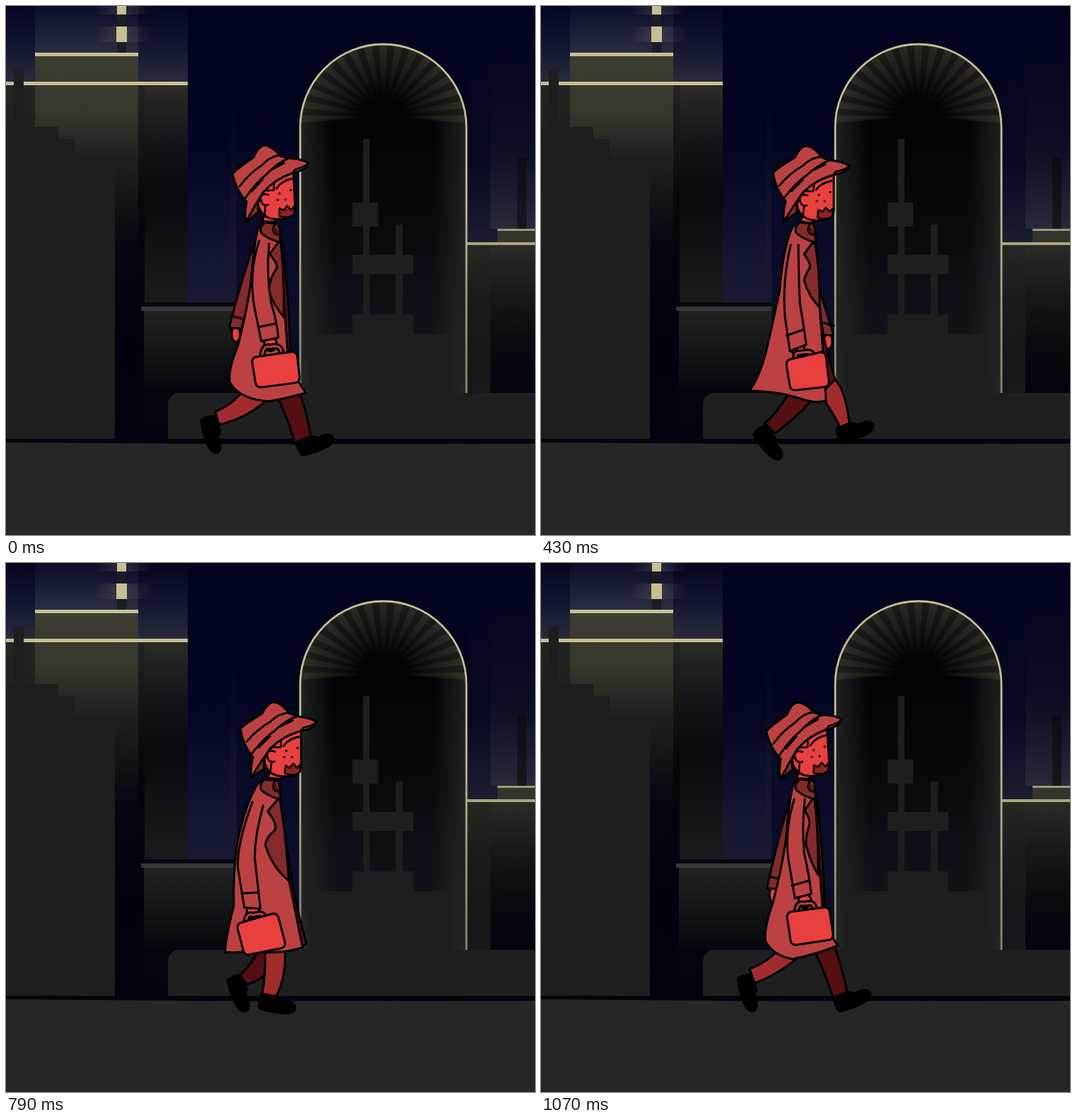
Animation, 748 px wide and 748 px high, one loop 1.14 s. Source, as an HTML page with a canvas:

```html
<!DOCTYPE html>
<html lang="en">
<head>
<meta charset="utf-8">
<title>Night walk</title>
<style>
html, body { margin: 0; width: 100%; height: 100%; overflow: hidden; background: #02031e; }
canvas { display: block; width: 748px; height: 748px; }
</style>
</head>
<body>
<canvas id="stage" width="748" height="748"></canvas>
<script>
const ctx = document.getElementById('stage').getContext('2d');
const COAT = '#bb4142', SHADE = '#832a2c', DEEP = '#541012', LEG = '#a12c2e', SKIN = '#e83f3f';
const CREAM = '#c5bf93', TOWN = '#1e1e1e';

// ---------- city ----------
function rect(x, y, w, h, ...colors) {
  const g = ctx.createLinearGradient(0, y, 0, y + h);
  colors.forEach((c, i) => g.addColorStop(i / Math.max(1, colors.length - 1), c));
  ctx.fillStyle = colors.length > 1 ? g : colors[0];
  ctx.fillRect(x, y, w, h);
}

function side(x0, x1, y, h, color) {
  const g = ctx.createLinearGradient(x0, 0, x1, 0);
  g.addColorStop(0, color);
  g.addColorStop(1, color.replace(/[\d.]+\)$/, '0)'));
  ctx.fillStyle = g;
  ctx.fillRect(Math.min(x0, x1), y, Math.abs(x1 - x0), h);
}

function leftBlocks() {
  rect(0, 0, 257, 108, '#05061f', '#12142f', '#292b3c');
  rect(41, 0, 146, 67, '#0b0d29', '#2b2d42');
  for (const [y, h] of [[0, 12], [29, 22]]) {
    side(163, 125, y, h, 'rgba(150,146,120,.22)');
    side(163, 208, y, h, 'rgba(150,146,120,.22)');
  }
  rect(157, 0, 13, 66, '#1b1c24');
  rect(157, 0, 13, 12, CREAM);
  rect(156, 29, 15, 22, CREAM);
  rect(0, 112, 41, 110, '#22251f', TOWN);
  rect(41, 71, 146, 150, '#3d3d32', '#36372d', TOWN);
  rect(154, 220, 42, 391, '#1e1f1e', '#04050e', '#01020f', '#02030f');
  rect(187, 112, 9, 310, '#22241f', '#07080d', '#02030d');
  rect(196, 112, 61, 308, '#2b2c26', '#15161a', '#08090e', '#121315', '#1a1a1a');
  rect(41, 66, 146, 5, CREAM);
  rect(0, 107, 257, 5, CREAM);
  rect(195, 431, 131, 180, '#232320', '#131416', '#05060d', '#02030e');
  rect(196, 419, 130, 5, '#07070c');
  rect(191, 425, 135, 6, '#393635');
  rect(11, 90, 14, 90, TOWN);
  rect(0, 171, 74, 441, TOWN);
  rect(70, 188, 27, 424, TOWN);
  rect(90, 220, 64, 392, TOWN);
}

function rightBlocks() {
  rect(651, 0, 97, 335, '#02031e', '#05061f', '#090a21', '#1b1d31');
  rect(685, 60, 63, 255, 'rgba(20,22,40,0)', 'rgba(18,20,38,.4)', 'rgba(50,52,66,.65)');
  rect(723, 215, 13, 101, '#0b0c15', '#17181b');
  rect(695, 318, 53, 17, '#34352c');
  rect(651, 338, 97, 210, '#2b2c28', '#171819', '#090a0f', '#03040d');
  rect(651, 338, 34, 210, 'rgba(32,33,31,.3)', 'rgba(32,33,31,.7)');
  rect(695, 315, 53, 3, '#9d9975');
  rect(651, 334, 97, 4, '#aaa57e');
}

function arch() {
  const cx = 533.5, cy = 171.5, r = 117.5, hub = 160;
  const shape = new Path2D();
  shape.moveTo(416, 547);
  shape.arc(cx, cy, r, Math.PI, 2 * Math.PI);
  shape.lineTo(651, 547);
  ctx.save();
  ctx.clip(shape);
  rect(416, 50, 235, 497, '#030308', '#030308', '#08080d', '#101117', '#15161b');
  side(416, 464, 160, 387, 'rgba(46,49,43,.65)');
  side(651, 603, 160, 387, 'rgba(46,49,43,.65)');
  const glow = ctx.createRadialGradient(cx, hub, 30, cx, hub, 118);
  glow.addColorStop(0, 'rgba(72,70,55,0)');
  glow.addColorStop(1, 'rgba(72,70,55,.42)');
  ctx.fillStyle = glow;
  ctx.fillRect(416, 50, 235, 110);
  for (let i = 0; i < 17; i++) {
    const a = Math.PI * (1 + i / 16);
    ctx.beginPath();
    ctx.moveTo(cx, hub - 4);
    for (const d of [-.05, .05]) ctx.lineTo(cx + 125 * Math.cos(a + d), hub + 114 * Math.sin(a + d));
    ctx.fill();
  }
  rect(505, 188, 9, 250, TOWN);
  rect(551, 309, 10, 130, TOWN);
  rect(490, 278, 36, 34, TOWN);
  rect(490, 352, 86, 27, TOWN);
  rect(490, 436, 86, 30, TOWN);
  rect(430, 464, 200, 84, TOWN);
  ctx.restore();
  const edge = ctx.createLinearGradient(0, 54, 0, 547);
  edge.addColorStop(0, CREAM);
  edge.addColorStop(.4, CREAM);
  edge.addColorStop(1, '#85836a');
  ctx.strokeStyle = edge;
  ctx.lineWidth = 2.8;
  ctx.stroke(shape);
}

function city() {
  rect(0, 0, 748, 748, '#02031e', '#03041f', '#080a27', '#0c0e2c', '#03040f', '#03040f');
  rect(257, 230, 69, 190, 'rgba(40,42,62,0)', 'rgba(40,42,62,.5)');
  rect(318, 120, 8, 304, 'rgba(24,25,45,0)', 'rgba(24,25,45,.7)');
  leftBlocks();
  rightBlocks();
  arch();
  ctx.fillStyle = '#1f1f1f';
  ctx.beginPath();
  ctx.roundRect(229, 547, 540, 90, 16);
  ctx.fill();
  rect(0, 612, 748, 136, '#262626');
  draw('M0 612L748 612L748 619L330 619.500L0 617Z', '#04040f', 0);
}

// ---------- walker: key poses on a 16-step cycle ----------
const poses = [
  { at: 0, head: '-5 -1 -3', wrist: '324 450', hand: '374 478', bag: '347 497 411 488 416 532 354 540',
    coat: 'M358 309Q351 330 347 385Q342 425 328 480Q312 520 317 533Q330 556 372 559Q400 554 424 547Q404 520 398 487Q392 400 386 330Z',
    front: 'M388 330L373 351Q384 364 383 370Q373 385 371 403Q380 425 393 440Q393 370 388 330Z',
    inner: 'M389 330Q400 400 402 487L396 500L390 400Z',
    arm: 'M358 332Q342 380 352 430L361 474L385 469Q384 450 375 420Q368 380 372 336', cuff: 'M357 454L381 449',
    near: 'M334 545Q322 562 296 574L301 592Q345 582 376 550Z', nearShoe: '299 590 73',
    far: 'M382 550Q396 575 409 620L431 610Q425 570 414 545Z', farShoe: '421 612 -20' },
  { at: 4, head: '-1 -1 0', wrist: '375 470', hand: '385 480', bag: '360 495 415 482 425 526 371 542',
    coat: 'M358 309Q344 330 338 410Q332 450 323 490Q306 535 303 552Q334 549 370 558Q386 563 420 560Q416 510 399 436Q397 360 386 330Z',
    front: 'M386 332L374 350Q384 364 382 370Q375 384 375 395Q378 415 399 436Q397 360 386 332Z',
    inner: 'M392 420Q404 490 412 530L402 542L396 440Z',
    arm: 'M358 336Q350 390 360 430L372 481L394 473Q392 455 378 410Q368 370 371 336', cuff: 'M366 456L387 449',
    near: 'M356 550Q346 568 328 580L337 600Q380 590 404 555Z', nearShoe: '336 588 84',
    far: 'M360 560Q360 590 360 617L381 615Q391 580 392 560Z', farShoe: '370 616 0' },
  { at: 6, head: '0 0 0', wrist: '405 460', hand: '364 487', bag: '346 501 402 488 408 538 353 544',
    coat: 'M358 309Q344 330 337 405Q325 460 318 490Q306 532 294 544Q340 545 372 557Q390 562 403 558Q400 500 394 426Q394 360 386 330Z',
    front: 'M386 332L372 351Q382 364 380 370Q373 382 372 388Q378 410 394 426Q394 360 386 332Z',
    inner: 'M392 420Q402 490 416 528L402 542L396 440Z',
    arm: 'M353 338Q341 390 345 440L352 488L375 479Q372 455 366 420Q364 370 364 338', cuff: 'M347 466L370 458',
    near: 'M392 545Q414 575 426 603L437 597Q430 535 412 526Z', nearShoe: '428 593 -18',
    far: 'M352 545Q332 578 316 590L331 604Q370 575 386 552Z', farShoe: '323 601 50' },
  { at: 8, head: '3 0 0', wrist: '418 462', hand: '353 491', bag: '336 504 400 488 406 533 349 550',
    coat: 'M358 309Q344 325 330 410Q328 440 318 485Q306 535 301 546Q335 554 372 556Q400 555 418 544Q410 500 398 436Q396 360 386 330Z',
    front: 'M386 332L370 346Q384 362 382 372Q372 380 371 390Q380 415 398 436Q396 370 386 332Z',
    inner: 'M390 350Q406 470 428 529L416 542L396 440Z',
    arm: 'M350 338Q328 400 328 430L342 488L361 484Q358 455 355 420Q355 380 361 342', cuff: 'M336 466L357 462',
    near: 'M378 548Q398 585 413 623L429 615Q420 575 411 545Z', nearShoe: '421 618 -25',
    far: 'M345 548Q330 558 283 561L282 579Q370 590 368 548Z', farShoe: '281 568 100' },
  { at: 10, head: '3 -1 0', wrist: '402 468', hand: '343 495', bag: '322 512 377 496 392 546 334 557',
    coat: 'M358 309Q340 335 324 400Q319 440 320 485Q308 525 303 546Q315 552 330 548Q380 556 420 545Q412 500 400 446Q396 370 386 330Z',
    front: 'M386 332L370 351Q384 366 382 374Q368 384 367 396Q376 425 400 446Q394 370 386 332Z',
    inner: 'M390 350Q404 470 427 541L416 544L396 440Z',
    arm: 'M344 340Q322 400 321 430L330 488L354 490Q350 460 345 420Q346 390 361 346', cuff: 'M327 467L350 466',
    near: 'M374 545Q378 580 375 615L396 616Q404 580 400 540Z', nearShoe: '385 615 2',
    far: 'M345 548Q330 565 313 578L323 594Q366 590 378 550Z', farShoe: '319 590 88' },
  { at: 13, head: '4 -2 0', wrist: '360 470', hand: '362 491', bag: '333 507 396 490 405 538 344 551',
    coat: 'M358 309Q335 345 331 400Q325 440 326 485Q320 520 322 559Q345 550 372 552Q395 550 418 542Q408 500 401 456Q396 380 386 330Z',
    front: 'M388 330L370 352Q382 372 378 384Q366 396 366 404Q376 440 400 456Q396 380 388 330Z',
    inner: 'M390 350Q404 470 421 532L414 544L396 440Z',
    arm: 'M357 334Q336 390 341 430L351 486L371 487Q370 460 365 410Q364 370 369 338', cuff: 'M347 468L369 465',
    near: 'M350 545Q348 575 337 597L353 608Q385 590 382 545Z', nearShoe: '345 603 22',
    far: 'M384 545Q380 575 365 594L378 599Q400 575 412 540Z', farShoe: '371 597 30' },
  { at: 15, head: '-6 -1 -4', wrist: '328 455', hand: '373 478', bag: '347 494 407 486 414 532 354 541',
    coat: 'M358 309Q351 330 347 385Q342 425 328 480Q314 520 318 536Q330 556 356 560Q390 553 420 541Q404 520 398 487Q392 400 386 330Z',
    front: 'M386 330L373 350Q382 364 379 372Q374 385 375 400Q382 425 392 441Q392 370 386 330Z',
    inner: 'M389 330Q399 400 401 487L396 500L390 400Z',
    arm: 'M358 334Q344 380 350 420L359 474L382 468Q380 445 372 410Q369 370 373 334', cuff: 'M355 456L380 449',
    near: 'M336 545Q325 562 295 574L302 594Q340 580 372 550Z', nearShoe: '301 592 73',
    far: 'M385 545Q400 575 413 614L433 607Q425 570 415 542Z', farShoe: '424 611 -22' }
];

const numbers = s => s.match(/-?\d+(\.\d+)?/g).map(Number);

function blend(a, b, k) {
  const end = numbers(b);
  let i = 0;
  return a.replace(/-?\d+/g, v => (+v + (end[i++] - v) * k).toFixed(2));
}

function poseAt(step) {
  const i = poses.findLastIndex(p => p.at <= step);
  const a = poses[i], b = poses[(i + 1) % poses.length];
  const k = (step - a.at) / ((b.at || 16) - a.at);
  const pose = {};
  for (const part in a) if (part !== 'at') pose[part] = blend(a[part], b[part], k);
  return pose;
}

function draw(path, fill, width = 3) {
  const p = new Path2D(path);
  if (fill) { ctx.fillStyle = fill; ctx.fill(p); }
  if (width) { ctx.strokeStyle = '#000'; ctx.lineWidth = width; ctx.stroke(p); }
}

function dot(x, y, rx, ry, fill, outline) {
  ctx.beginPath();
  ctx.ellipse(x, y, rx, ry, 0, 0, 7);
  ctx.fillStyle = fill;
  ctx.fill();
  if (outline) { ctx.strokeStyle = '#000'; ctx.lineWidth = 3; ctx.stroke(); }
}

function tube(path, width, color) {
  const p = new Path2D(path);
  for (const [w, c] of [[width, '#000'], [width - 6, color]]) {
    ctx.lineWidth = w;
    ctx.strokeStyle = c;
    ctx.stroke(p);
  }
}

function placed(x, y, deg, paint, px = 0, py = 0) {
  ctx.save();
  ctx.translate(x + px, y + py);
  ctx.rotate(deg * Math.PI / 180);
  ctx.translate(-px, -py);
  paint();
  ctx.restore();
}

function leg(path, shoe, color) {
  draw(path, color);
  placed(...numbers(shoe), () =>
    draw('M-11 0Q-15 12 -11 21Q0 24 22 23Q42 21 40 11Q36 2 20 5L11 -1Z', '#000', 2));
}

function farArm(wrist) {
  const [x, y] = numbers(wrist);
  dot(x + 1, y + 14, 6, 11, SKIN, true);
  ctx.lineCap = 'butt';
  tube(`M364 325Q${(364 + x) / 2 - 3} ${(325 + y) / 2} ${x} ${y + 6}`, 20, SHADE);
  ctx.lineCap = 'round';
  draw(`M${x - 5} ${y - 12}L${x + 9} ${y - 8}M${x - 8} ${y + 5}L${x + 8} ${y + 6}`);
}

function bag(hand, corners) {
  const [hx, hy] = numbers(hand), c = numbers(corners);
  const along = k => [c[0] + (c[2] - c[0]) * k, c[1] + (c[3] - c[1]) * k];
  const [ax, ay] = along(.24), [bx, by] = along(.66);
  dot(hx, hy, 9, 10, SKIN, true);
  tube(`M${ax} ${ay}Q${ax + 1} ${hy + 1} ${hx} ${hy + 4}Q${bx} ${hy} ${bx} ${by}`, 9, COAT);
  ctx.beginPath();
  ctx.moveTo(...along(.5));
  for (const i of [2, 4, 6, 0]) ctx.arcTo(c[i], c[i + 1], c[(i + 2) % 8], c[(i + 3) % 8], 7);
  ctx.closePath();
  ctx.fillStyle = SKIN;
  ctx.strokeStyle = '#000';
  ctx.lineWidth = 3;
  ctx.fill();
  ctx.stroke();
}

function head() {
  draw('M370 290L367 305L384 307L388 298Z', SKIN);
  draw('M362 272Q360 290 372 298Q378 304 396 303Q414 302 414 288L414 238L385 250Z', SKIN);
  draw('M344 305L349 288L364 272Q360 286 362 292Q352 298 344 305Z', SHADE);
  draw('M377 268Q366 264 366 274Q367 284 376 282M372 284L370 299M375 262L385 262L386 254', null, 2.6);
  draw('M389 260Q398 248 412 247Q400 250 395 254', '#000', 2.6);
  draw('M392 288L391 299Q405 304 412 297L413 286L408 291L403 285L398 291Z', '#8b2325', 2.5);
  for (const [x, y] of [[393, 267], [409, 263], [390, 276], [401, 276]]) dot(x, y, 1.6, 1.6, '#000');
  draw('M328 236Q332 231 348 221L359 214C365 202 372 194 382 200Q390 204 397 214L408 218Q428 220 436 226' +
    'Q432 236 413 239Q388 246 370 264Q356 284 343 305Q342 290 346 276Q332 260 328 236Z', COAT);
  draw('M413 239L417 234Q430 232 436 226Q434 235 413 239Z', SHADE, 2.5);
  draw('M359 214L348 219M337 254Q352 236 370 226Q382 214 397 213M345 270Q360 250 376 239' +
    'Q392 224 408 218M381 234L402 224M354 262L370 246', null, 2.8);
}

function walker(p) {
  ctx.lineJoin = ctx.lineCap = 'round';
  farArm(p.wrist);
  leg(p.far, p.farShoe, DEEP);
  leg(p.near, p.nearShoe, LEG);
  draw(p.inner, DEEP);
  draw(p.coat, COAT);
  draw(p.front, SHADE);
  draw('M366 306Q357 314 361 321Q372 331 388 334Q388 316 385 308Z', SHADE);
  draw('M380 309Q375 316 380 322L387 324', DEEP, 2.5);
  bag(p.hand, p.bag);
  draw(p.arm, COAT);
  draw(p.cuff);
  placed(...numbers(p.head), head, 375, 290);
}

// Eight steps per 570 ms half, the third one slightly longer.
function stepAt(ms) {
  const t = ms % 1140, u = t % 570;
  const step = u < 220 ? Math.min(2, Math.floor(u / 70)) : Math.floor((u - 10) / 70);
  return step + (t < 570 ? 0 : 8);
}

let start, shown = -1;
function tick(now) {
  start ??= now;
  const step = stepAt(now - start);
  if (step !== shown) {
    shown = step;
    city();
    walker(poseAt(step));
  }
  requestAnimationFrame(tick);
}
requestAnimationFrame(tick);
</script>
</body>
</html>
```
